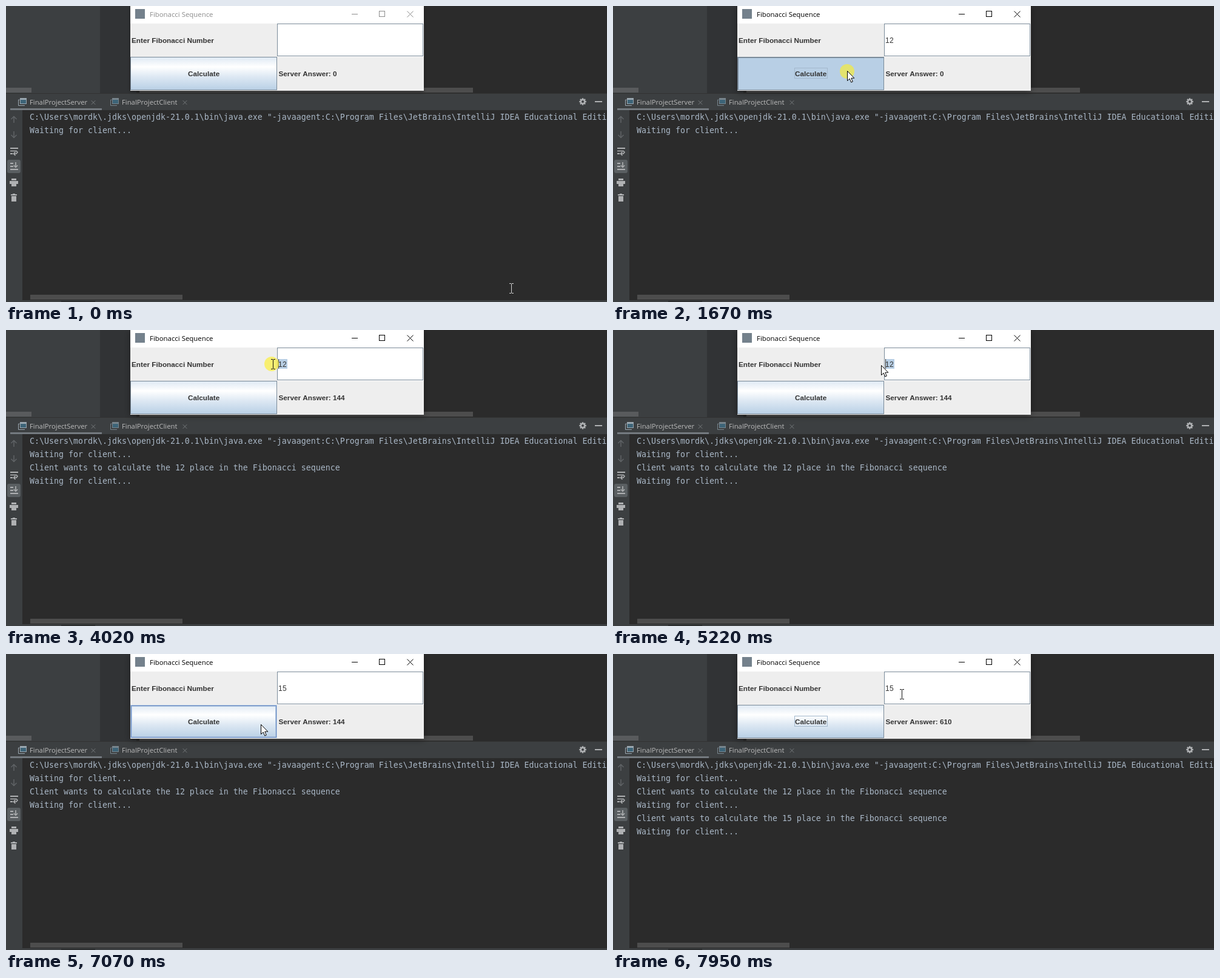
Write an HTML page with a canvas that moves like this. It is 991 by 489 pixels and loops after 8 s.

```html
<!DOCTYPE html>
<html lang="en">
<head>
<meta charset="utf-8">
<title>Fibonacci Sequence</title>
<style>
html, body { margin: 0; width: 100%; height: 100%; overflow: hidden; background: #2b2b2b; }
canvas { display: block; }
</style>
</head>
<body>
<canvas id="stage" width="991" height="489"></canvas>
<script>
const ctx = document.getElementById('stage').getContext('2d');
const LOOP = 8000;
const TICK = 67;
const BLINK = 500;
const UI = '"Open Sans", "Noto Sans", sans-serif';
const SWING = '"Liberation Sans", Arial, sans-serif';
const MONO = '13.29px "DejaVu Sans Mono", monospace';
const BOLD = 'bold 11.75px ' + SWING;
const PANEL = '#3c3f41', ICON = '#afb1b3', EDGE = '#7a8a99', INK = '#333333', PALE = '#b8cfe5';

// Moments of the session
const ACTIVATE = 70, SELECT = 4020, DESELECT = 4620;
const rounds = [
  { n: 12, press: 1670, release: 1810, log: 2010 },
  { n: 15, press: 7130, release: 7270, log: 7470 }
];
const edits = [
  { at: 450, value: '1' },
  { at: 470, value: '12' },
  { at: SELECT, value: '12', selected: true },
  { at: 6240, value: '1' },
  { at: 6500, value: '15' }
];

const within = (v, a, b) => v >= a && v < b;
const linear = u => u;
const easeOut = u => u * (2 - u);

function fibonacci(n) {
  let a = 0, b = 1;
  while (n-- > 0) [a, b] = [b, a + b];
  return a;
}

function pointerAt(t) {
  let x = 833, y = 466;
  const glide = (start, end, tx, ty, ease = linear) => {
    if (t < start) return;
    const ticks = Math.max(1, Math.round((end - start) / TICK) + 1);
    const u = ease(Math.min(1, (Math.floor((t - start) / TICK + 0.02) + 1) / ticks));
    x += (tx - x) * u;
    y += (ty - y) * u;
  };
  const jump = (at, tx, ty) => glide(at, at, tx, ty);

  jump(ACTIVATE, 577, 131);
  glide(870, 1470, 386, 107, easeOut);
  glide(2400, 2540, 423, 82);
  glide(2600, 3540, 482, 57, easeOut);
  jump(SELECT, 440, 56);
  jump(DESELECT, 438, 55);
  glide(4760, 5160, 442, 58);
  glide(6640, 7070, 420, 116);
  glide(7610, 7950, 476, 66);
  return [Math.round(x), Math.round(y)];
}

function stateAt(t) {
  const [x, y] = pointerAt(t);
  const done = rounds.filter(r => t >= r.release);
  const edit = edits.findLast(e => t >= e.at);
  const pressed = rounds.some(r => within(t, r.press, r.release));
  const onButton = within(t, rounds[0].press, SELECT) || t >= rounds[1].press;
  return {
    x, y, edit, pressed, onButton,
    active: t >= ACTIVATE,
    selecting: within(t, SELECT, DESELECT),
    hover: within(x, 205, 447) && within(y, 84, 139),
    inField: within(x, 447, 689) && within(y, 29, 84),
    caret: edit && !onButton && Math.floor((t - edit.at) / BLINK) % 2 === 0,
    answer: done.length ? fibonacci(done.at(-1).n) : 0,
    logged: rounds.filter(r => t >= r.log)
  };
}

function box(x, y, w, h, color) {
  ctx.fillStyle = color;
  ctx.fillRect(x, y, w, h);
}

function frame(x, y, w, h, color) {
  ctx.strokeStyle = color;
  ctx.lineWidth = 1;
  ctx.strokeRect(x + 0.5, y + 0.5, w - 1, h - 1);
}

function text(str, x, y, font, color, spacing = '0px') {
  ctx.font = font;
  ctx.letterSpacing = spacing;
  ctx.fillStyle = color;
  ctx.fillText(str, x, y);
}

function line(color, width, ...points) {
  ctx.strokeStyle = color;
  ctx.lineWidth = width;
  ctx.beginPath();
  for (const p of points) ctx.lineTo(...p);
  ctx.stroke();
}

function cross(x, y, r, color) {
  line(color, 1, [x - r, y - r], [x + r, y + r]);
  line(color, 1, [x + r, y - r], [x - r, y + r]);
}

function chevron(x, y, r, dir, color) {
  line(color, 1.5, [x - r, y - r * dir], [x, y], [x + r, y - r * dir]);
}

function tab(x, name, color, closeX) {
  line(color, 1, [x + 2.5, 155], [x + 0.5, 155], [x + 0.5, 164.5], [x + 11, 164.5]);
  box(x + 3, 152, 11, 10, color);
  box(x + 4, 155, 9, 6, '#3d6478');
  text(name, x + 19, 163, '11.3px ' + UI, '#bbbbbb');
  cross(closeX, 159.5, 3.3, '#75797b');
}

function gear(x, y) {
  ctx.save();
  ctx.translate(x, y);
  for (let i = 0; i < 8; i++) {
    ctx.rotate(Math.PI / 4);
    box(3, -1.2, 2.8, 2.4, ICON);
  }
  ctx.strokeStyle = ICON;
  ctx.lineWidth = 2.4;
  ctx.beginPath();
  ctx.arc(0, 0, 3.2, 0, Math.PI * 2);
  ctx.stroke();
  ctx.restore();
}

function toolbar() {
  const dim = '#606467';
  for (const [y, dir] of [[187.5, -1], [212.5, 1]]) {
    line(dim, 1.5, [13, y - 5.5], [13, y + 5.5]);
    chevron(13, y + 5 * dir, 4.5, dir, dim);
  }

  // Soft wrap
  box(7, 234, 13, 2, ICON);
  box(7, 243, 4, 2, ICON);
  line(ICON, 1.6, [7, 239.5], [17, 239.5], [19, 241.5], [17, 244], [13, 244]);
  line(ICON, 1.6, [15.5, 241], [12.5, 244], [15.5, 247]);

  // Scroll to end
  ctx.fillStyle = '#5a5f62';
  ctx.beginPath();
  ctx.roundRect(2, 254, 22, 22, 3);
  ctx.fill();
  box(7, 259, 5, 2, ICON);
  box(7, 264, 5, 2, ICON);
  box(7, 269, 13, 2, ICON);
  line(ICON, 1.6, [16, 258], [16, 266]);
  chevron(16, 266.5, 3.2, 1, ICON);

  // Print
  box(9, 285, 8, 3, ICON);
  box(6, 289, 14, 5, ICON);
  box(9, 294, 8, 4, ICON);

  // Clear
  box(11, 310, 4, 1, ICON);
  box(8, 311, 10, 2, ICON);
  box(9, 314, 8, 9, ICON);
}

function ide(s) {
  box(0, 0, 991, 489, '#2b2b2b');
  box(0, 0, 155, 144, PANEL);
  box(155, 0, 60, 144, '#313335');
  box(0, 135, 42, 8, '#595b5d');
  box(220, 135, 550, 8, '#4d4d4d');

  box(0, 144, 991, 1, '#323232');
  box(0, 145, 991, 27, PANEL);
  box(0, 172, 27, 317, PANEL);
  box(7, 169, 151, 3, '#747a80');
  tab(20, 'FinalProjectServer', '#9aa7b0', 144);
  tab(172, 'FinalProjectClient', '#78858d', 295);
  gear(951, 158);
  box(971, 157, 12, 2, ICON);
  toolbar();

  const wait = 'Waiting for client...';
  const log = [
    'C:\\Users\\mordk\\.jdks\\openjdk-21.0.1\\bin\\java.exe "-javaagent:C:\\Program Files\\JetBrains\\IntelliJ IDEA Educational Edition',
    wait
  ];
  for (const r of s.logged) {
    log.push(`Client wants to calculate the ${r.n} place in the Fibonacci sequence`, wait);
  }
  log.forEach((row, i) => text(row, 39, 188 + i * 22, MONO, '#a9b7c6'));

  box(40, 477, 251, 8, '#4d4d4d');
  box(0, 486, 991, 3, PANEL);
  box(91, 487, 56, 2, '#2b2d2e');
}

function button(s) {
  const [x, y, w, h] = [205, 84, 242, 55];
  const ring = (inset, color) => frame(x + inset, y + inset, w - 2 * inset, h - 2 * inset, color);
  const shine = ctx.createLinearGradient(0, y, 0, y + h);
  ['#dde8f3', '#ffffff', '#dde8f3', PALE].forEach((c, i) => shine.addColorStop(Math.min(1, i * 0.3 + (i > 2)), c));

  box(x, y, w, h, s.pressed ? PALE : shine);
  if (s.hover && !s.pressed) {
    ring(0, PALE);
    ring(1, '#6382bf');
    ring(2, PALE);
  } else {
    ring(0, EDGE);
  }
  if (s.pressed) {
    box(x, y, w, 2, EDGE);
    box(x, y, 2, h, EDGE);
  }
  if (s.onButton) frame(299, 102, 55, 18, '#a3b8cc');
  text('Calculate', 300, 116, BOLD, INK);
}

function field({ edit, caret }) {
  box(447, 29, 242, 55, '#ffffff');
  frame(447, 29, 241, 54, EDGE);
  if (!edit) return;
  const width = 7 * edit.value.length;
  if (edit.selected) box(449, 48, width + 1, 16, PALE);
  text(edit.value, 449, 61, '12px ' + SWING, INK, '0.33px');
  if (caret) box(449 + (edit.selected ? 0 : width), 48, 1, 16, INK);
}

function dialog(s) {
  ctx.save();
  ctx.shadowColor = 'rgba(0,0,0,.4)';
  ctx.shadowBlur = s.active ? 10 : 5;
  ctx.shadowOffsetY = 2;
  box(205, 0, 484, 140, '#eeeeee');
  ctx.restore();

  const ink = s.active ? '#000000' : '#8c8c8c';
  box(205, 0, 484, 29, '#ffffff');
  box(213, 5, 16, 16, '#74818c');
  text('Fibonacci Sequence', 237, 18, '11.4px ' + UI, ink);
  box(570, 13, 10, 1, ink);
  frame(615, 8, 10, 10, ink);
  cross(666.5, 13.5, 5, ink);

  text('Enter Fibonacci Number', 207, 61, BOLD, INK);
  text('Server Answer: ' + s.answer, 449.5, 116, BOLD, INK);
  button(s);
  field(s);
}

function arrow(x, y) {
  const outline = [[0, 0], [0, 16], [3.7, 12.6], [6.2, 18.6], [8.8, 17.5], [6.3, 11.7], [11.3, 11.7]];
  ctx.beginPath();
  for (const [dx, dy] of outline) ctx.lineTo(x + 0.5 + dx, y + 0.5 + dy);
  ctx.closePath();
  ctx.fillStyle = '#ffffff';
  ctx.fill();
  ctx.strokeStyle = '#000000';
  ctx.lineWidth = 1;
  ctx.stroke();
}

function beam(x, y, color) {
  box(x, y - 7, 1, 15, color);
  for (const dy of [-8, 8]) {
    box(x - 3, y + dy, 3, 1, color);
    box(x + 1, y + dy, 3, 1, color);
  }
}

function highlight(x, y) {
  ctx.fillStyle = 'rgba(255,240,30,.6)';
  ctx.beginPath();
  ctx.arc(x, y, 12, 0, Math.PI * 2);
  ctx.fill();
}

function draw(t) {
  const s = stateAt(t);
  ide(s);
  dialog(s);
  if (s.pressed) highlight(s.x, s.y + 1);
  if (s.selecting) highlight(s.x - 2, s.y);

  if (!s.active) beam(s.x, s.y, '#d4d4d4');
  else if (s.inField || s.selecting) beam(s.x, s.y, '#111111');
  else arrow(s.x, s.y);
}

const begin = performance.now();

function tick(now) {
  draw(Math.max(0, now - begin) % LOOP);
  requestAnimationFrame(tick);
}

tick(begin);
</script>
</body>
</html>
```
